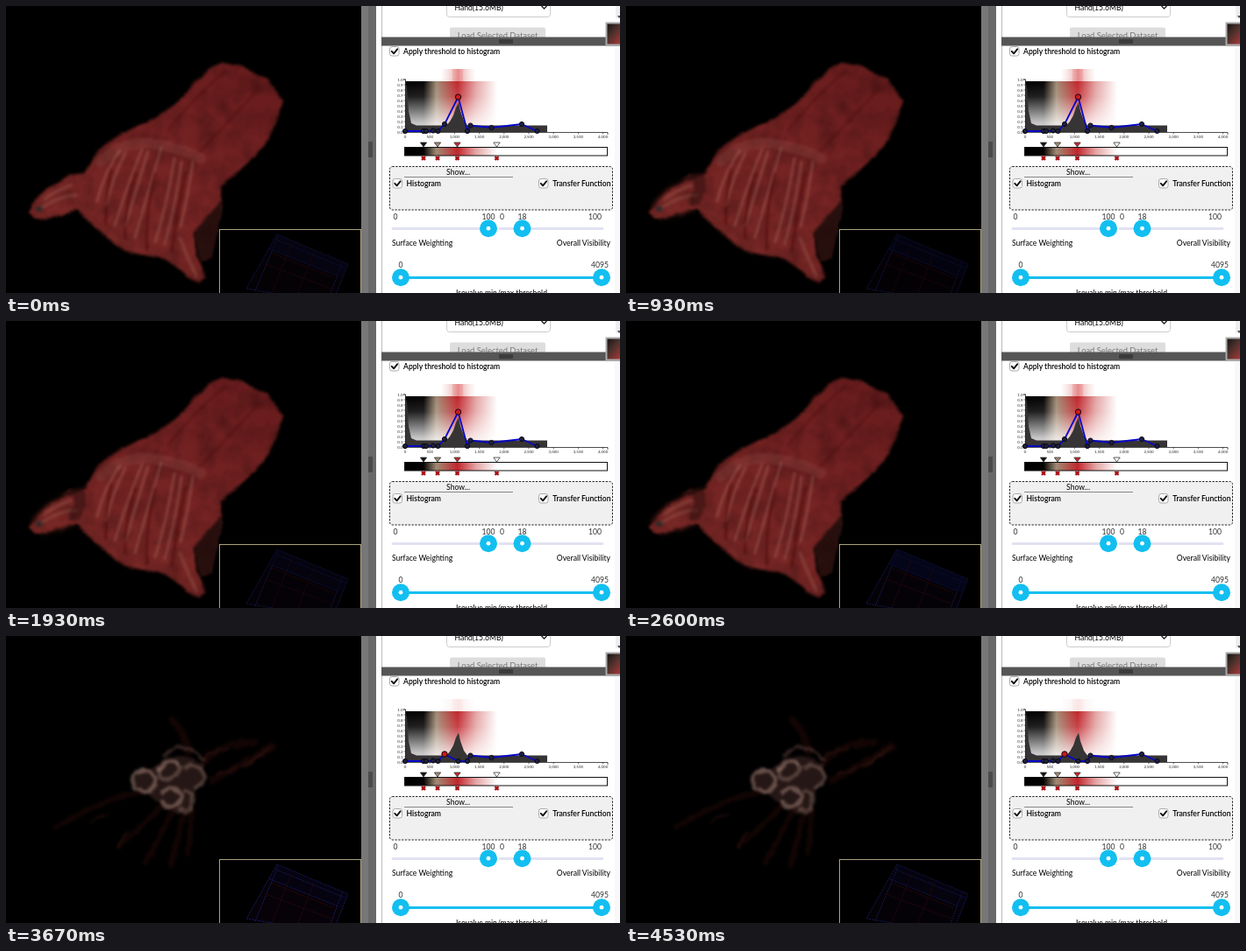
Animation of 700 by 328 pixels, one loop 4.59 s. Source, as an HTML page:

```html
<!DOCTYPE html>
<html lang="en">
<head>
<meta charset="utf-8">
<style>
  html, body { margin: 0; width: 100%; height: 100%; overflow: hidden; background: #000; }
  svg { display: block; width: 700px; height: 328px; font: 8.6px Lato, sans-serif; }
  .medium { font-weight: 600; }
  .axis { font-size: 4.4px; fill: #222; }
  .end { text-anchor: end; }
  .mid { text-anchor: middle; }
  .line { fill: none; stroke-linecap: round; stroke-linejoin: round; }
</style>
</head>
<body>
<svg viewBox="0 0 700 328">
  <defs>
    <linearGradient id="colors" gradientUnits="userSpaceOnUse" x1="455" x2="560">
      <stop offset="0"/>
      <stop offset=".2" stop-color="#050303"/>
      <stop offset=".34" stop-color="#a08b74"/>
      <stop offset=".57" stop-color="#c1272d"/>
      <stop offset=".77" stop-color="#e5a5a5"/>
      <stop offset="1" stop-color="#fff"/>
    </linearGradient>
    <linearGradient id="fade" x2="0" y2="1">
      <stop stop-color="#fff" stop-opacity="0"/>
      <stop offset=".3" stop-color="#fff" stop-opacity=".12"/>
      <stop offset=".8" stop-color="#fff" stop-opacity=".75"/>
      <stop offset="1" stop-color="#fff" stop-opacity=".92"/>
    </linearGradient>
    <linearGradient id="plume">
      <stop stop-color="#e8c8c0" stop-opacity=".1"/>
      <stop offset=".5" stop-color="#d85858" stop-opacity=".6"/>
      <stop offset="1" stop-color="#f0c0c0" stop-opacity=".1"/>
    </linearGradient>
    <linearGradient id="mini" y2="1">
      <stop stop-color="#111"/>
      <stop offset=".4" stop-color="#4a302b"/>
      <stop offset="1" stop-color="#c23a3a"/>
    </linearGradient>
    <linearGradient id="skin" gradientUnits="userSpaceOnUse" x1="280" y1="75" x2="130" y2="290">
      <stop stop-color="#681c1d"/>
      <stop offset=".45" stop-color="#742222"/>
      <stop offset="1" stop-color="#782826"/>
    </linearGradient>
    <filter id="flesh" x="-10%" y="-10%" width="120%" height="120%" color-interpolation-filters="sRGB">
      <feTurbulence type="fractalNoise" baseFrequency=".05" numOctaves="4" seed="4" result="noise"/>
      <feDisplacementMap in="SourceGraphic" in2="noise" scale="5" xChannelSelector="R" yChannelSelector="G" result="shape"/>
      <feColorMatrix in="noise" values="0 0 0 0 .1  0 0 0 0 .02  0 0 0 0 .02  .6 0 0 0 -.22" result="mottle"/>
      <feComposite in="mottle" in2="shape" operator="in" result="shade"/>
      <feMerge><feMergeNode in="shape"/><feMergeNode in="shade"/></feMerge>
      <feGaussianBlur stdDeviation=".9"/>
    </filter>
    <filter id="bone" filterUnits="userSpaceOnUse" x="0" y="30" width="405" height="298" color-interpolation-filters="sRGB">
      <feTurbulence type="fractalNoise" baseFrequency=".12" numOctaves="3" seed="7" result="noise"/>
      <feDisplacementMap in="SourceGraphic" in2="noise" scale="6" xChannelSelector="R" yChannelSelector="G"/>
      <feGaussianBlur stdDeviation="1.5"/>
    </filter>
    <filter id="soft" filterUnits="userSpaceOnUse" x="0" y="0" width="405" height="328">
      <feGaussianBlur stdDeviation="1.4"/>
    </filter>
    <clipPath id="view"><path d="M245 257h159v71H245z"/></clipPath>
    <clipPath id="upper"><path d="M428 0h272v36H428z"/></clipPath>
  </defs>

  <rect width="700" height="328"/>

  <g id="hand">
    <g filter="url(#flesh)" stroke-linejoin="round">
      <path fill="#28100e" d="M245 203L229 212 215 250 217 277 223 292 235 288 241 258 247 227Z"/>
      <path fill="url(#skin)" stroke="#3a1411" stroke-opacity=".6" stroke-width="3" d="M245 65L268 69 297 83 315 107 311 125 301 150 283 172 264 190 246 205 246 222
        228 242 214 260 215 277 222 295 228 310 221 316 209 311 196 300 186 292 175 286 163 287 152 284 137 280 122 270 107 258 93 244 82 233
        62 239 45 245 33 242 26 235 33 222 45 209 60 202 74 193 89 191 96 180 106 165 124 151 148 138 170 128 188 116 203 102 216 87 231 72Z"/>
    </g>
    <g class="line" filter="url(#soft)" stroke="#b98474" stroke-opacity=".34" stroke-width="2.6">
      <path d="M130 165Q112 190 104 223M136 168Q122 195 114 228M155 164Q140 200 124 251M162 166Q150 205 136 252M177 162Q163 210 147 265M192 174Q184 225 170 270M200 178Q194 225 181 272M213 178Q208 215 199 252"/>
      <path d="M108 178Q135 152 170 158T222 174" stroke-opacity=".13" stroke-width="12"/>
      <path d="M80 216Q59 217 40 231M74 205Q54 212 44 221M198 265Q208 290 217 308" stroke-opacity=".22" stroke-width="4"/>
    </g>
    <g class="line" filter="url(#soft)" stroke="#400d0c" stroke-opacity=".45" stroke-width="3">
      <path d="M120 187Q113 216 114 250M148 192Q134 230 136 266M170 192Q158 240 161 278M205 190Q196 230 189 280"/>
      <path d="M250 75Q213 105 185 142M288 95Q245 142 220 167" stroke-opacity=".25"/>
    </g>
    <g id="thumb" class="line" filter="url(#bone)" stroke="#080403">
      <path stroke-width="7" stroke-opacity=".6" d="M88 190L60 201 44 209 28 229M80 235L62 240 42 247"/>
      <path stroke-width="13" stroke-opacity=".35" d="M78 222Q86 213 84 200"/>
    </g>
    <ellipse cx="38" cy="231" rx="4" ry="3" fill="#2b2a29" filter="url(#bone)"/>
  </g>

  <g id="bones" class="line" filter="url(#bone)">
    <g stroke="#3a100e" stroke-opacity=".32" stroke-width="6">
      <path d="M155 178Q112 185 58 218M177 195Q153 220 128 240M190 199Q176 230 159 259M203 201Q196 230 188 263M211 198Q211 225 207 249"/>
      <path d="M209 132Q200 105 190 97M226 142Q252 120 282 122M236 164Q270 147 304 126" stroke-width="9"/>
    </g>
    <g stroke="#6d3023" stroke-opacity=".45" stroke-width="1.2">
      <path d="M225 140Q238 128 253 130M240 159Q270 150 304 126M272 151L293 133M116 202L96 212M139 223L127 240"/>
    </g>
    <path fill="#5c3a36" fill-opacity=".4" stroke="none" d="M149 154L170 150 184 138 204 137 225 146 228 162 215 178 211 197 195 203 177 190 156 179 146 168Z"/>
    <g stroke="#a18077" stroke-opacity=".55" stroke-width="5">
      <path d="M150 155q14-5 19 6t-9 17q-14 0-15-11t5-12M174 153q10-13 22-8M179 178q12-8 19 0t-4 15-16-4"/>
      <path d="M196 145q8 9-8 17t-12-9M205 150q14-5 20 6t-9 17M204 177q13 1 8 15t-13 6" stroke-opacity=".38"/>
    </g>
    <path stroke="#78564f" stroke-opacity=".4" stroke-width="4" d="M181 137q11-14 25-9t19 14"/>
  </g>

  <rect x="243.5" y="255.5" width="161" height="75" fill="#000" stroke="#a8a17c"/>
  <g clip-path="url(#view)">
    <g id="cube" class="line" stroke="#1c2170" stroke-width="1" stroke-dasharray="1 2">
      <path fill="#070309" d="M309 261L390 295 372 340 274 323Z"/>
      <path d="M308 267L386 299M301 278L379 309M310 264L284 326M383 294L368 334"/>
      <path id="band" stroke="none" fill="#070a28" d="M309 261L390 295 383 311 300 279Z"/>
      <path stroke="#34090d" d="M302 282L374 311M296 295L371 323M325 273L303 328M351 282L333 328"/>
    </g>
  </g>

  <rect x="405" width="17" height="328" fill="#696969"/>
  <rect x="405" width="8" height="328" fill="#777"/>
  <rect x="413" y="155" width="5" height="18" fill="#4a4a4a"/>
  <rect x="422" width="278" height="328" fill="#fff"/>
  <rect x="694" y="46" width="6" height="282" fill="#f8f8f8"/>
  <path d="M428.5 0V328" stroke="#bbb"/>
  <g clip-path="url(#upper)">
    <rect x="502.5" y="-12" width="118" height="24.5" rx="3" fill="#fff" stroke="#ccc"/>
    <text x="511.5" y="5">Hand(15.6MB)</text>
    <path d="M610.5 0l3 3 3-3" fill="none" stroke="#222" stroke-width="1.4"/>
    <rect x="506" y="24.5" width="109" height="20" rx="2" fill="#ddd"/>
    <text class="mid" x="560.5" y="37" fill="#777" font-size="9.4">Load Selected Dataset</text>
    <path d="M695 0h5v14h-5z" fill="#eee"/>
    <path d="M697 11l2 3 2-3z" fill="#555"/>
  </g>
  <rect x="428" y="35.5" width="272" height="10" fill="#565656"/>
  <rect x="562" y="38" width="16" height="5" fill="#3b3b3b"/>
  <rect x="684.5" y="19.5" width="20" height="25" fill="url(#mini)" stroke="#aaa" stroke-width="2"/>

  <text class="medium" x="453" y="54.5">Apply threshold to histogram</text>
  <rect x="455" y="86" width="105" height="58" fill="url(#colors)"/>
  <rect x="455" y="86" width="105" height="58" fill="url(#fade)"/>
  <g id="plumes">
    <rect x="497" y="72" width="37" height="14" fill="url(#plume)"/>
    <rect x="509" y="72" width="12" height="14" fill="#d33" fill-opacity=".15"/>
  </g>
  <path fill="#373435" d="M455 144V86L457 92 459 120 462 134 468 136.5H502L506 132 510 125 513 116 516 110.5 518 120 522 131 526 136.500H617V144Z"/>
  <path d="M453 84H455.5V144.5H686V147" fill="none" stroke="#222" stroke-width=".8"/>
  <g id="axes"></g>
  <path id="curve" class="line" stroke="#0707c8" stroke-width="1.8"/>
  <g id="nodes" stroke="#080818" stroke-width="1"></g>

  <rect x="454.5" y="161.5" width="231" height="9.5" fill="url(#colors)" stroke="#111"/>
  <g id="stops"></g>

  <rect x="437.5" y="183.5" width="254" height="49.5" rx="3" fill="#f0f0f0" stroke="#222" stroke-dasharray="2.3 1.5"/>
  <text class="mid" x="515.5" y="193">Show...</text>
  <path d="M454 195.5H578" stroke="#888"/>
  <text class="medium" x="456.5" y="206">Histogram</text>
  <text class="medium end" x="689.5" y="206">Transfer Function</text>
  <g id="checks"></g>

  <g fill="#333">
    <text x="441.5" y="244">0</text>
    <text class="end" x="557.5" y="244">100</text>
    <text x="563" y="244">0</text>
    <text class="mid" x="588.5" y="244">18</text>
    <text class="end" x="679" y="244">100</text>
    <text class="mid" x="450" y="299">0</text>
    <text class="end" x="687" y="299">4095</text>
  </g>
  <path d="M441 254.5H559M563 254.5H680" stroke="#e1e2f2" stroke-width="3" stroke-linecap="round"/>
  <path d="M450 310.5H680" stroke="#12bff0" stroke-width="3"/>
  <g id="knobs"></g>
  <text x="440" y="274">Surface Weighting</text>
  <text class="end" x="689" y="274">Overall Visibility</text>
  <text class="mid" x="565" y="330.5">Isovalue min/max threshold</text>
</svg>
<script>
const LOOP = 4590, DROP = 3200;
const $ = id => document.getElementById(id);
const fill = (id, items, draw) => { $(id).innerHTML = items.map(draw).join(''); };
const ramp = (t, from, to) => Math.min(1, Math.max(0, (t - from) / (to - from)));

fill('axes', [...Array(20).keys()], i => {
  if (i < 11) {
    const y = 84 + i * 6;
    return `<text class="axis end" x="452.5" y="${y + 1.5}">${(1 - i / 10).toFixed(1)}</text>
      <path d="M453.5 ${y}h2" stroke="#222" stroke-width=".6"/>`;
  }
  const x = 455 + (i - 11) * 28.2;
  return `<text class="axis mid" x="${x}" y="151">${((i - 11) * 500).toLocaleString('en')}</text>
    <path d="M${x} 144v2.5" stroke="#222" stroke-width=".6"/>`;
});

fill('stops', [[476, '#111'], [492, '#a28c75'], [514.5, '#c4282c'], [559.5, '#fff']], ([x, color]) =>
  `<path d="M${x - 3.7} 156h7.4l-3.7 5z" fill="${color}" stroke="#333" stroke-width=".8"/>
   <path d="M${x - 2} 172l4 4m0-4l-4 4" stroke="#a81015" stroke-width="2.4"/>`);

fill('checks', [[437, 46], [440.5, 197], [607, 197]], ([x, y]) =>
  `<rect x="${x + .5}" y="${y + .5}" width="10.5" height="10.5" rx="2.5" fill="#fff" stroke="#aaa"/>
   <path d="M${x + 2.8} ${y + 5.8}l2.3 2.5 4-5" class="line" stroke="#111" stroke-width="1.9"/>`);

fill('knobs', [[550, 254.2], [588.5, 254.2], [450, 310.2], [679, 310.2]], ([x, y]) =>
  `<circle cx="${x}" cy="${y}" r="10" fill="#12bff0"/><circle cx="${x}" cy="${y}" r="2.4" fill="#fff"/>`);

function drawCurve(dropped) {
  const points = [[455, 143], [476, 143], [479, 143], [487, 142.5], [492.5, 143], [500, 135],
    [515.5, dropped ? 143 : 104], [526, 143], [529.5, 136.5], [553.5, 139], [588, 135], [605.5, 143]];
  const active = dropped ? 5 : 6;
  $('curve').setAttribute('d', 'M' + points.join('L'));
  fill('nodes', points, ([x, y], i) =>
    `<circle cx="${x}" cy="${y}" r="${i === active ? 3.2 : 2.6}" fill="${i === active ? '#d01818' : '#20203a'}"/>`);
}

let shown;
function frame(now) {
  const t = now % LOOP, dropped = t >= DROP;
  if (dropped !== shown) {
    drawCurve(shown = dropped);
    $('hand').style.display = dropped ? 'none' : '';
    $('bones').style.display = dropped ? '' : 'none';
    $('plumes').setAttribute('opacity', dropped ? .22 : 1);
  }
  // The view is redrawn in steps, about fifteen a second.
  const step = Math.floor(t / 66.7) * 66.7;
  $('thumb').setAttribute('opacity', ramp(step, 0, 330) - ramp(step, 2700, 3070));
  $('cube').setAttribute('opacity', .72 + .2 * ramp(step, 2400, 3100) + .08 * Math.sin(step / 190));
  $('band').setAttribute('opacity', dropped ? .25 : .45 + .25 * Math.sin(step / 310));
  requestAnimationFrame(frame);
}
requestAnimationFrame(frame);
</script>
</body>
</html>
```
